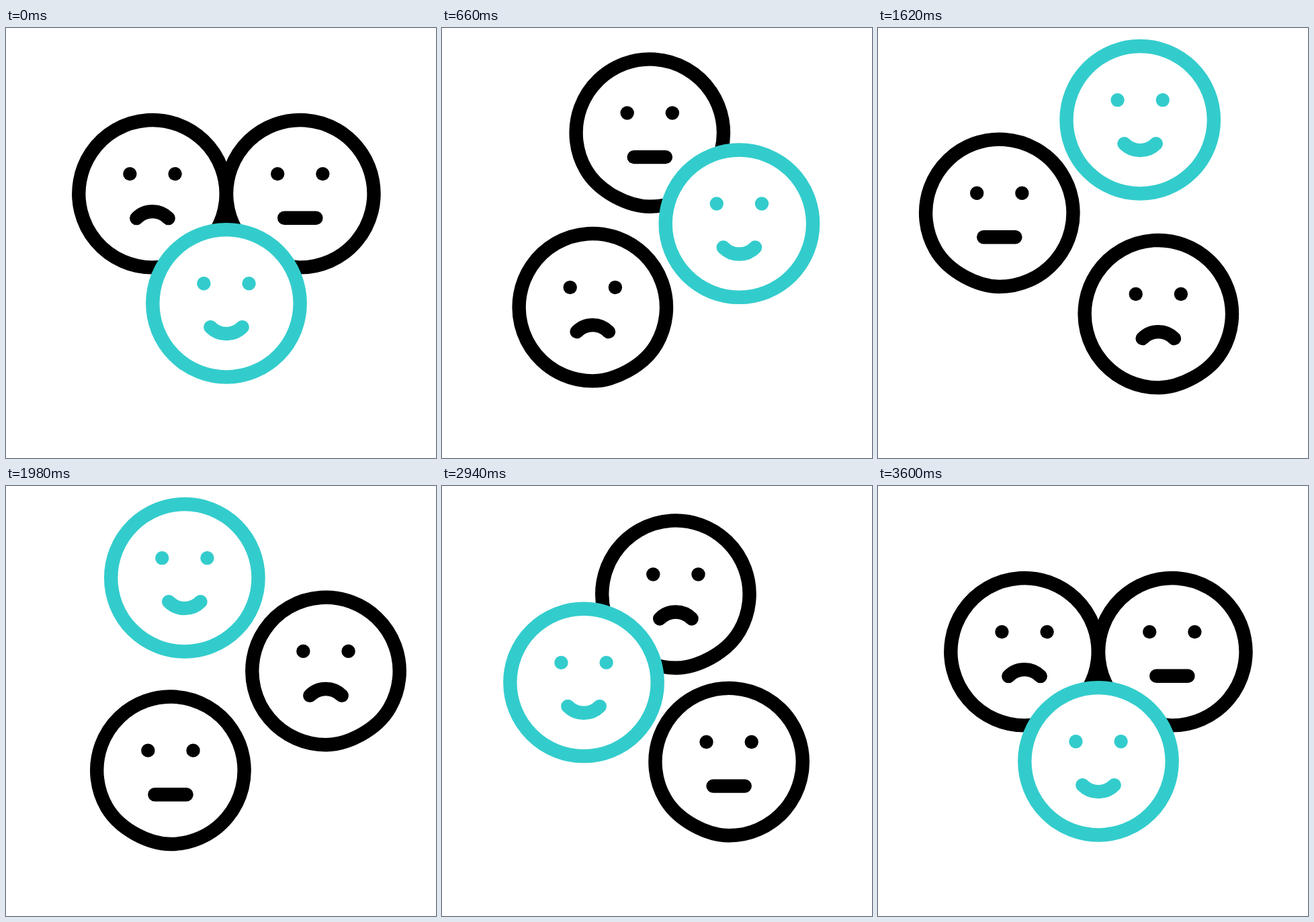
Write an HTML page that moves like this. It is 640x640 px and loops after 3620 ms.

```html
<!DOCTYPE html>
<html lang="en">
<head>
<meta charset="utf-8">
<title>Moods</title>
<style>
  html, body { margin: 0; width: 100%; height: 100%; overflow: hidden; background: #fff; }
  svg { display: block; width: 100%; height: 100%; color: #000; }
  #happy { color: #3cc; }
  .line { fill: #fff; stroke: currentColor; stroke-width: 20.4; stroke-linecap: round; }
  .eye { fill: currentColor; }
</style>
</head>
<body>
<svg viewBox="0 0 640 640">
  <defs>
    <g id="eyes" class="eye">
      <circle cx="-33.6" cy="-29.6" r="10.2"/>
      <circle cx="33.6" cy="-29.6" r="10.2"/>
    </g>
    <path id="dented" d="M0 109.7C31 109.7 75.5 88.6 95 54.85A109.7 109.7 0 1 0 0 109.7Z"/>
  </defs>
  <g id="sad">
    <use href="#dented" class="line"/>
    <use href="#eyes"/>
    <path class="line" d="M-23.7 36.4A33.2 33.2 0 0 1 23.7 36.4"/>
  </g>
  <g id="neutral">
    <use href="#dented" class="line" transform="scale(-1 1)"/>
    <use href="#eyes"/>
    <path class="line" d="M-23.6 36H23.6"/>
  </g>
  <g id="happy">
    <circle class="line" r="109.7"/>
    <use href="#eyes"/>
    <path class="line" d="M-23.7 35.4A33.2 33.2 0 0 0 23.7 35.4"/>
  </g>
</svg>
<script>
const LOOP = 3620, STEP = 1200, TICK = 20;

// Three stops per face; each leg bows outward by its two handle heights.
const routes = {
  sad: { stops: [[218, 246.7], [331, 487], [464, 170]], bows: [[91, 91], [101, 83], [59, 59]] },
  neutral: { stops: [[437.8, 246.7], [192, 170], [329.5, 487]], bows: [[66, 66], [89, 89], [79, 79]] },
  happy: { stops: [[328, 409.8], [464, 170], [192, 170]], bows: [[56, 56], [56, 56], [60, 60]] }
};

function makeLeg([x0, y0], [x1, y1], [h0, h1]) {
  const dx = x1 - x0, dy = y1 - y0, chord = Math.hypot(dx, dy);
  const handle = (k, h) => [x0 + dx * k - dy / chord * h, y0 + dy * k + dx / chord * h];
  const path = document.createElementNS('http://www.w3.org/2000/svg', 'path');
  path.setAttribute('d', `M${x0} ${y0}C${handle(1 / 3, h0)} ${handle(2 / 3, h1)} ${x1} ${y1}`);
  return { path, length: path.getTotalLength() };
}

const faces = Object.entries(routes).map(([id, { stops, bows }]) => ({
  node: document.getElementById(id),
  legs: stops.map((stop, i) => makeLeg(stop, stops[(i + 1) % 3], bows[i]))
}));

const ease = t => t * t * (3 - 2 * t);

function draw() {
  const time = Math.min(Math.floor(performance.now() % LOOP / TICK) * TICK, 3 * STEP);
  const index = Math.min(Math.floor(time / STEP), 2);
  const progress = ease(time / STEP - index);
  for (const { node, legs } of faces) {
    const { path, length } = legs[index];
    const { x, y } = path.getPointAtLength(progress * length);
    node.setAttribute('transform', `translate(${x} ${y})`);
  }
  requestAnimationFrame(draw);
}
draw();
</script>
</body>
</html>
```
